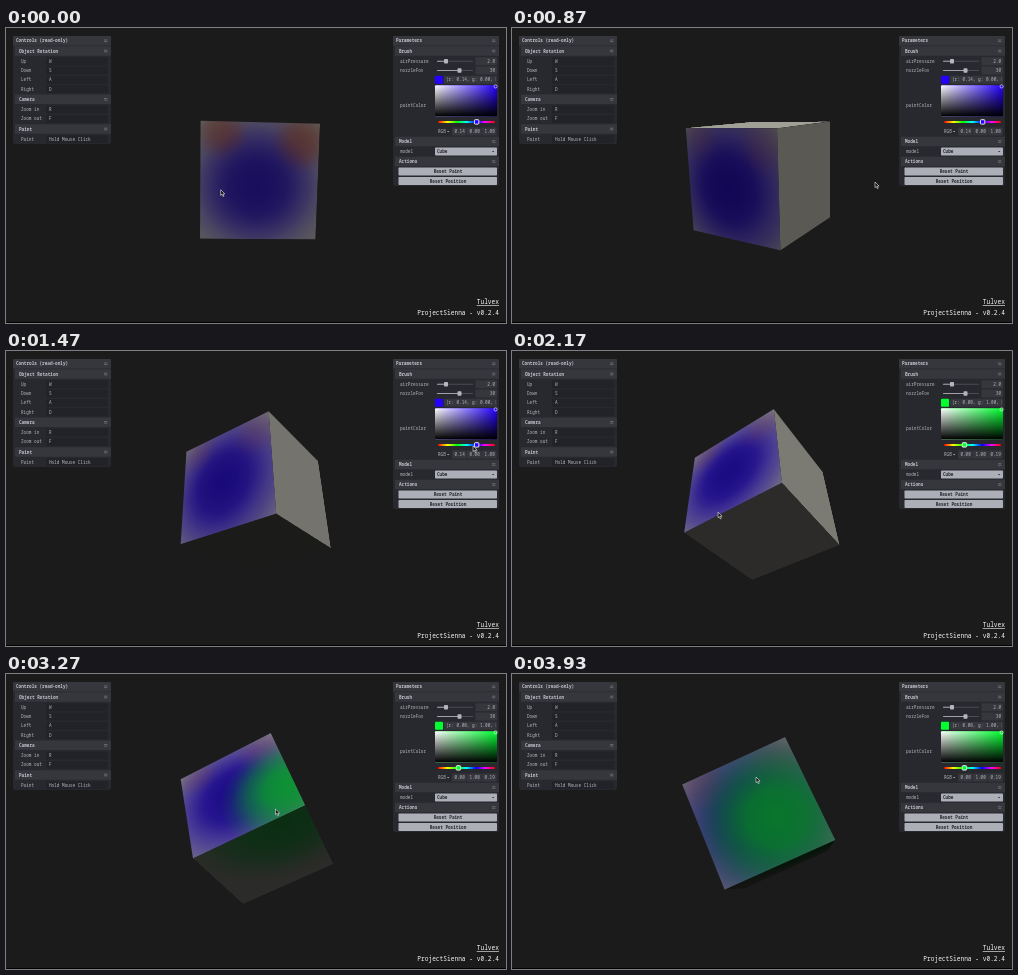
An HTML page for the animation above (3970 ms loop, 500x295 px).

```html
<!DOCTYPE html>
<html lang="en">
<head>
<meta charset="utf-8">
<title>Spray paint cube</title>
<style>
html, body { margin: 0; width: 100%; height: 100%; overflow: hidden; background: #1b1b1b; }
#stage { position: relative; width: 500px; height: 295px; overflow: hidden; background: #1b1b1b; }
#view { position: absolute; inset: 0; perspective: 353px; }
#cube { position: absolute; left: 199.6px; top: 97.1px; width: 100.8px; height: 100.8px; transform-style: preserve-3d; }
.face { position: absolute; inset: 0; background: #b4b2a8; backface-visibility: hidden; }
svg { position: absolute; left: 0; top: 0; }
text { font: 500 4.35px "Noto Sans Mono", "DejaVu Sans Mono", monospace; fill: #b4b5bc; white-space: pre; }
.title { font-weight: 600; fill: #c4c5cc; }
.dark { fill: #26272c; font-weight: 600; }
.foot { font-size: 6.2px; fill: #f6f6f6; }
</style>
</head>
<body>
<div id="stage">
  <div id="view"><div id="cube"></div></div>
  <svg id="ui" width="500" height="295" viewBox="0 0 500 295">
    <defs>
      <linearGradient id="white"><stop stop-color="#fff"/><stop offset="1" stop-color="#fff" stop-opacity="0"/></linearGradient>
      <linearGradient id="black" x2="0" y2="1"><stop stop-opacity="0"/><stop offset="1"/></linearGradient>
      <linearGradient id="hues"></linearGradient>
      <clipPath id="codeClip"><rect x="438" y="47" width="52" height="10"/></clipPath>
    </defs>
  </svg>
</div>
<script>
const LOOP = 3970, SIZE = 100.8;
const ui = document.getElementById('ui');
const cube = document.getElementById('cube');

const mix = (a, b, k) => a + (b - a) * k;
const ramp = (t, a, b) => Math.min(1, Math.max(0, (t - a) / (b - a)));

// Linear interpolation between key points [time, ...values]
function sample(keys, t) {
  let i = 0;
  while (i < keys.length - 2 && t >= keys[i + 1][0]) i++;
  const [t0, ...a] = keys[i], [t1, ...b] = keys[i + 1];
  return a.map((v, n) => mix(v, b[n], ramp(t, t0, t1)));
}

// ---- interface ----
function add(name, attrs, text, parent = ui) {
  const el = document.createElementNS('http://www.w3.org/2000/svg', name);
  for (const k in attrs) el.setAttribute(k, attrs[k]);
  if (text) el.textContent = text;
  parent.append(el);
  return el;
}
const box = (x, y, width, height, fill, rx = 0.8) => add('rect', { x, y, width, height, fill, rx });
const label = (x, y, text, cls = '', anchor = 'start') =>
  add('text', { x, y: y + 1.5, class: cls, 'text-anchor': anchor }, text);
const caret = (x, y, fill) => add('path', { d: `M${x} ${y}h2.3l-1.15 1.3z`, fill });

function bar(x, y, w, text, dx = 4) {
  box(x, y - 4.8, w, 9.6, '#36373d', 0.5);
  label(x + dx, y, text, 'title');
  add('path', { d: `M${x + w - 7} ${y - 0.8}h3.4m-3.4 1.6h3.4`, stroke: '#85868d', 'stroke-width': 0.6 });
}

const controls = {
  'Object Rotation': { Up: 'W', Down: 'S', Left: 'A', Right: 'D' },
  Camera: { 'Zoom in': 'R', 'Zoom out': 'F' },
  Paint: { Paint: 'Hold Mouse Click' }
};
box(7, 8, 98, 108, '#28292e', 2);
bar(7, 12.8, 98, 'Controls (read-only)', 3);
let row = 23;
for (const group in controls) {
  bar(9, row, 96, group);
  row += 10.3;
  for (const [name, key] of Object.entries(controls[group])) {
    box(40, row - 4, 62, 8, '#222328');
    label(15, row, name);
    label(43, row, key);
    row += 9.3;
  }
  row += 0.8;
}

box(387, 8, 106, 150, '#28292e', 2);
bar(387, 12.8, 106, 'Parameters', 3);
bar(389, 23, 104, 'Brush');
bar(389, 113.5, 104, 'Model');
bar(389, 133.5, 104, 'Actions');

function slider(y, name, knob, value) {
  label(394, y, name);
  box(431, y - 0.5, 36, 1, '#4b4c54', 0.5);
  box(431, y - 0.5, knob - 431, 1, '#a0a2aa', 0.5);
  box(knob - 2, y - 2.2, 4, 4.4, '#b4b6be');
  box(469.5, y - 4, 21.5, 8, '#36373d');
  label(489, y, value, '', 'end');
}
slider(33.3, 'airPressure', 440, '2.0');
slider(42.5, 'nozzleFov', 453.5, '30');

const swatch = box(429, 47.7, 8, 8);
box(438, 47.7, 53, 8, '#36373d');
const code = label(440, 51.8, ' ');
code.setAttribute('clip-path', 'url(#codeClip)');
label(394, 77.5, 'paintColor');
const [field] = ['#20f', 'url(#white)', 'url(#black)'].map(fill => box(429, 57.3, 62, 31, fill, 1));
add('circle', { cx: 489.6, cy: 58.4, r: 1.6, fill: 'none', stroke: '#fff', 'stroke-width': 0.6 });
for (let i = 0; i <= 6; i++) {
  add('stop', { offset: i / 6, 'stop-color': `hsl(${i * 60} 100% 50%)` }, '', document.getElementById('hues'));
}
box(432, 93, 57, 2, 'url(#hues)', 1);
const marker = box(0, 91.7, 4.4, 4.4);
marker.setAttribute('stroke', '#fff');
marker.setAttribute('stroke-width', 0.9);
label(432, 103.5, 'RGB');
caret(441, 103, '#b4b5bc');
const channels = [446, 461, 476].map(x => {
  box(x, 99.5, 14.6, 8, '#36373d');
  return label(x + 2.4, 103.5, ' ');
});
label(394, 123.7, 'model');
box(429, 119.6, 62, 8, '#adafb8');
label(431, 123.7, 'Cube', 'dark');
caret(486, 123, '#26272c');
['Reset Paint', 'Reset Position'].forEach((text, i) => {
  const y = 143.5 + i * 9.5;
  box(392.5, y - 4, 98.5, 8, '#adafb8');
  label(442, y, text, 'dark', 'middle');
});
label(493, 274.6, 'Tulvex', 'foot', 'end').setAttribute('text-decoration', 'underline');
label(493, 285.8, 'ProjectSienna - v0.2.4', 'foot', 'end');
box(0, 294, 500, 1, '#000', 0);
const cursor = add('path', {
  d: 'M0 0V5.6L1.3 4.4L2.3 6.7L3.2 6.3L2.3 4.1H4.1Z', fill: '#111', stroke: '#eee', 'stroke-width': 0.6
});

// ---- cube ----
const SIDES = {
  near: '', right: 'rotateY(90deg)', bottom: 'rotateX(-90deg)', left: 'rotateY(-90deg)', top: 'rotateX(90deg)'
};
const faces = {};
for (const side in SIDES) {
  const el = document.createElement('div');
  const turn = `${SIDES[side]} translateZ(${SIZE / 2}px)`;
  el.className = 'face';
  el.style.transform = turn;
  cube.append(el);
  faces[side] = { el, matrix: new DOMMatrix(turn) };
}

// time, roll, pitch, yaw in degrees
const spin = [
  [0, 1.2, -6, 3], [560, 1.2, -6, 3], [870, -2.1, -11, -34.8], [1130, -1.8, -5, -35], [1200, -1.8, -5, -35],
  [1600, -3, 43.3, -32.6], [3215, -3, 43.3, -32.6], [3270, -18.3, 40.5, -11], [3630, -33, 47.7, 17], [3765, -24, 12, -2]
];

function drawCube(t) {
  const [roll, pitch, yaw] = sample(spin, t);
  const turn = `rotateZ(${roll}deg) rotateX(${pitch}deg) rotateY(${yaw}deg)`;
  const matrix = new DOMMatrix(turn);
  cube.style.transform = turn;
  for (const { el, matrix: side } of Object.values(faces)) {
    // Light falls from above and a little from the viewer
    const { m32, m33 } = matrix.multiply(side);
    el.style.filter = `brightness(${0.46 - 0.42 * m32 + 0.13 * m33})`;
  }
}

function spray(u, v, r, rgb, a) {
  const stops = [[1, 0], [.9, 32], [.55, 60], [.18, 82], [0, 100]]
    .map(([k, p]) => `rgba(${rgb},${(a * k).toFixed(3)}) ${p}%`);
  return `radial-gradient(circle ${r * SIZE}px at ${u * 100}% ${v * 100}%, ${stops})`;
}

const BLUE = '38,10,205', GREEN = '10,195,55', RED = '175,70,35';
function paint(t) {
  const blue = ramp(t, 0, 530), green = ramp(t, 2170, 3230), more = ramp(t, 3270, 3700);
  faces.near.el.style.background = [
    spray(mix(.92, .64, more), mix(.72, .62, more), mix(.25, .6, green) + more * .2, GREEN, Math.min(1, green * 1.3) * .92),
    spray(.47, .53, .5, '26,8,150', .6),
    spray(.18, .1, .24, RED, mix(.5, .15, blue)),
    spray(.85, .16, .28, RED, mix(.55, .15, blue)),
    spray(.48, .54, mix(.74, .88, blue), BLUE, mix(.75, .92, blue)),
    'linear-gradient(#aeaca8, #aeaca8)'
  ].join();
  faces.bottom.el.style.background = [
    spray(.78, .05, .85, GREEN, ramp(t, 2750, 3230) * .8),
    'linear-gradient(#b4b2a8, #b4b2a8)'
  ].join();
}

// ---- picker and pointer ----
function drawPicker(t) {
  const hue = mix(248.4, 131.4, ramp(t, 1600, 1880));
  const rgb = [5, 3, 1].map(n => {
    const k = (n + hue / 60) % 6;
    return 1 - Math.max(0, Math.min(k, 4 - k, 1));
  });
  const nums = rgb.map(v => v.toFixed(2));
  for (const el of [swatch, field, marker]) el.setAttribute('fill', `rgb(${rgb.map(v => Math.round(v * 255))})`);
  marker.setAttribute('x', 432 + hue / 360 * 56 - 2.2);
  code.textContent = `(r: ${nums[0]}, g: ${nums[1]}, b: ${nums[2]})`;
  channels.forEach((el, i) => { el.textContent = nums[i]; });
}

const path = [
  [0, 214.5, 161.5], [420, 300, 166], [540, 363, 154], [1200, 363, 154], [1480, 470.5, 93], [1600, 470.5, 93],
  [1880, 452.4, 93], [1960, 452.4, 93], [2130, 219, 115], [2170, 206, 161.5], [3270, 269.5, 135], [3630, 258, 135],
  [3930, 244, 103]
];
function drawPointer(t) {
  const [x, y] = sample(path, t);
  const sweep = 18 * Math.sin(ramp(t, 0, 420) * 2 * Math.PI) - 22 * Math.sin(ramp(t, 2170, 3270) * 5 * Math.PI);
  cursor.setAttribute('transform', `translate(${x} ${y + sweep})`);
}

const start = performance.now();
function frame() {
  const t = (performance.now() - start) % LOOP;
  paint(t);
  drawCube(t);
  drawPicker(t);
  drawPointer(t);
  requestAnimationFrame(frame);
}
frame();
</script>
</body>
</html>
```
